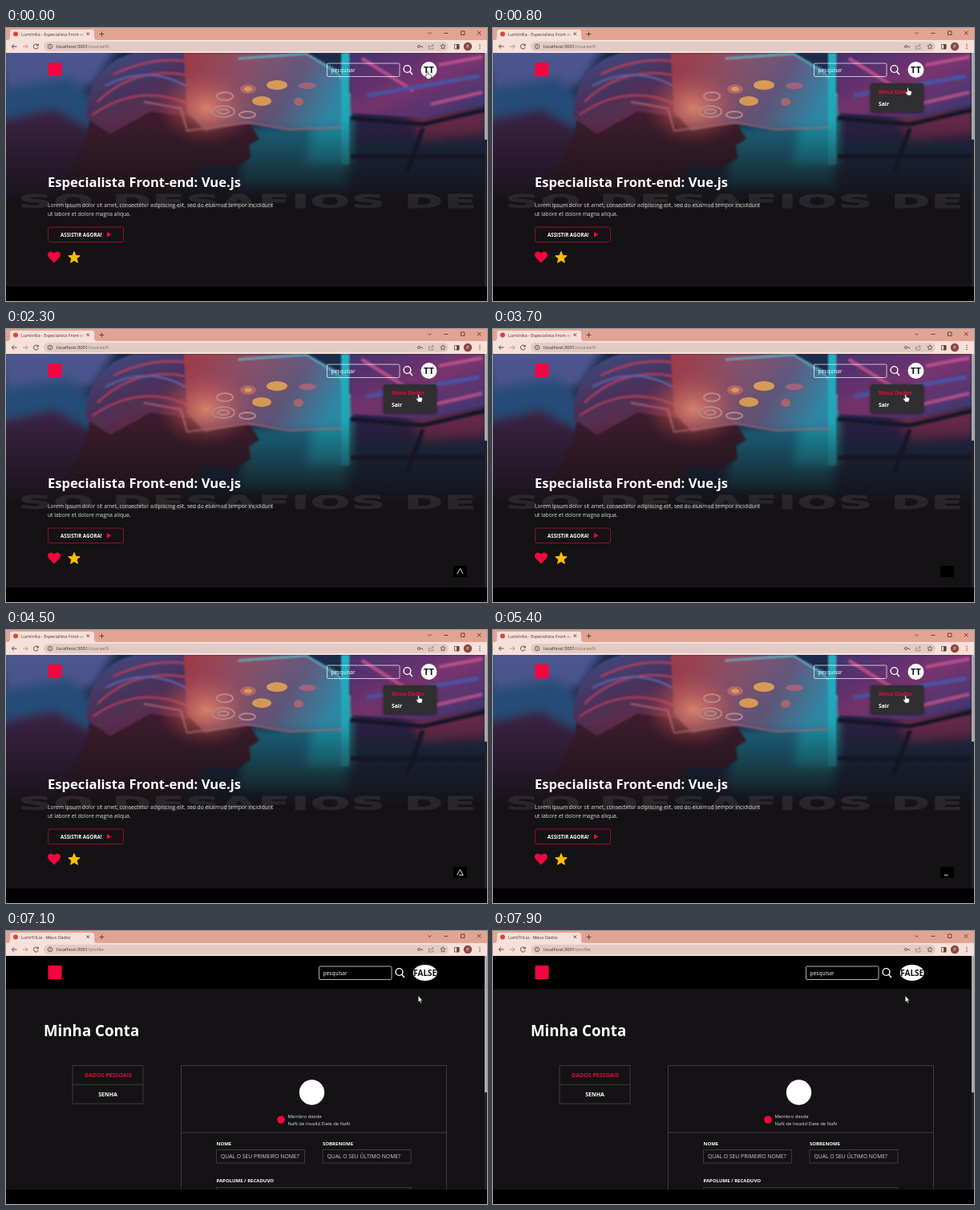
These frames come from a looping animation (600 px wide and 340 px high, 8000 ms). An HTML page:

```html
<!DOCTYPE html>
<html lang="pt">
<head>
<meta charset="utf-8">
<title>Lumitrilia</title>
<style>
html, body { margin: 0; width: 100%; height: 100%; overflow: hidden; background: #000; }
svg { display: block; width: 600px; height: 340px; }
text { font-family: "Open Sans", "Noto Sans", sans-serif; fill: #fff; white-space: pre; }
.b { font-weight: 700; }
.line { fill: none; stroke: #474648; stroke-width: .8; }
.icon { fill: none; stroke: #5b4742; stroke-width: 1; }
.white { fill: none; stroke: #fff; stroke-width: .9; }
.red { fill: #f5053f; }
</style>
</head>
<body>
<svg viewBox="0 0 600 340">
  <defs>
    <linearGradient id="fade" x2="0" y2="1">
      <stop offset="0" stop-color="#141214" stop-opacity="0"/>
      <stop offset=".4" stop-color="#141214" stop-opacity=".08"/>
      <stop offset=".65" stop-color="#141214" stop-opacity=".5"/>
      <stop offset=".92" stop-color="#141214"/>
    </linearGradient>
    <linearGradient id="visor" x2="1" y2=".3">
      <stop offset="0" stop-color="#a03a45"/>
      <stop offset=".35" stop-color="#8f4f66"/>
      <stop offset=".7" stop-color="#64597f"/>
      <stop offset="1" stop-color="#2e8fae"/>
    </linearGradient>
    <linearGradient id="hood" x2=".7" y2="1">
      <stop offset="0" stop-color="#3d4f8a"/>
      <stop offset=".45" stop-color="#4b3460"/>
      <stop offset="1" stop-color="#7b283f"/>
    </linearGradient>
    <linearGradient id="screen" x2="1" y2="1">
      <stop offset="0" stop-color="#43306f"/>
      <stop offset=".5" stop-color="#7a3570"/>
      <stop offset="1" stop-color="#353a78"/>
    </linearGradient>
    <radialGradient id="glow">
      <stop offset="0" stop-color="#ff9d78" stop-opacity=".75"/>
      <stop offset="1" stop-color="#d04848" stop-opacity="0"/>
    </radialGradient>
    <linearGradient id="tabFade">
      <stop offset="0" stop-color="#f7e0d9" stop-opacity="0"/>
      <stop offset="1" stop-color="#f7e0d9"/>
    </linearGradient>
    <filter id="soft" x="-20%" y="-20%" width="140%" height="140%"><feGaussianBlur stdDeviation="6"/></filter>
    <filter id="edge"><feGaussianBlur stdDeviation="1.2"/></filter>
    <clipPath id="view"><path d="M0 31H600V322H0z"/></clipPath>
  </defs>

  <g clip-path="url(#view)">
    <path d="M0 31H600V322H0z" fill="#141214"/>

    <g id="course">
      <path d="M0 31H597V215H0z" fill="#1c2b4a"/>
      <g filter="url(#soft)">
        <path d="M-10 20H140L110 70L0 90z" fill="#4b5790"/>
        <path d="M-10 75L80 60L130 110L90 140L-10 120z" fill="#28507e"/>
        <path d="M-10 115L60 100L150 150L160 215H-10z" fill="#3b2444"/>
        <path d="M300 125L425 115V200H290z" fill="#1b6c88"/>
        <path d="M385 110H428V170H375z" fill="#1c9bb0"/>
        <path d="M430 105H596V150H430z" fill="#2a2446"/>
        <path d="M430 140H600V200H430z" fill="#1c2c4a"/>
        <path d="M500 106L600 98V132L520 138z" fill="#6c2a4c"/>
      </g>
      <g filter="url(#edge)">
        <path d="M60 225C70 180 105 150 104 112C102 65 130 40 165 31H270L292 75L298 110L316 138L303 146L305 162L285 174L245 170L215 225z" fill="#3f1a2e"/>
        <path d="M100 112C100 65 125 40 160 31H262L278 80L238 112L180 104L130 132z" fill="url(#hood)"/>
        <path d="M114 92Q165 42 240 62M108 108Q165 68 226 94M134 58Q190 30 246 46" fill="none" stroke="#a8405c" stroke-width="2.5"/>
        <path d="M124 72Q180 42 234 78" fill="none" stroke="#5a64a8" stroke-width="2"/>
        <path d="M222 31H375L414 52L436 100L420 124L354 126L300 118L248 128L226 104z" fill="url(#visor)"/>
        <path d="M290 38L375 32L416 58L436 98" fill="none" stroke="#52b4c6" stroke-width="1.8"/>
        <path d="M172 92L218 100L226 128L302 118L354 127L420 124" fill="none" stroke="#b96f80" stroke-width="1.4"/>
        <path d="M428 31H597V96L522 112L430 106z" fill="url(#screen)"/>
        <path d="M418 31H428V170H418z" fill="#23b0c2"/>
        <path d="M430 112L520 120L597 102M520 125L500 180M430 160H597" fill="none" stroke="#16162a" stroke-width="5"/>
        <path d="M444 38L508 78M540 46L594 36M530 95L594 80" stroke="#b8508c" stroke-width="4"/>
        <path d="M450 84L590 60" stroke="#4a55a8" stroke-width="5"/>
      </g>
      <ellipse cx="250" cy="100" rx="62" ry="48" fill="url(#glow)"/>
      <g fill="#dfa05a">
        <ellipse cx="302" cy="76" rx="10" ry="6" fill="#b76a70"/>
        <ellipse cx="302" cy="76" rx="5" ry="3"/>
        <ellipse cx="338" cy="71" rx="13" ry="6"/>
        <ellipse cx="319" cy="91" rx="12" ry="6"/>
        <ellipse cx="365" cy="92" rx="6" ry="5" fill="#b06a72"/>
        <ellipse cx="376" cy="72" rx="11" ry="4" fill="#a86680"/>
      </g>
      <g fill="none" stroke="#c08f92" stroke-width="2">
        <ellipse cx="271" cy="104" rx="14" ry="7"/>
        <ellipse cx="271" cy="104" rx="7" ry="3"/>
        <ellipse cx="273" cy="85" rx="10" ry="5"/>
        <ellipse cx="301" cy="108" rx="10" ry="4"/>
      </g>
      <path d="M0 31H597V240H0z" fill="url(#fade)"/>
      <text transform="translate(16 223.500) scale(2.5 1)" font-size="23" letter-spacing=".9" class="b" stroke="#fff" stroke-width=".8" opacity=".08" style="font-family:'DejaVu Sans',sans-serif">SO DESAFIOS DE</text>

      <text x="52" y="198" font-size="16.600" class="b">Especialista Front-end: Vue.js</text>
      <g font-size="6.7" style="opacity:.85">
        <text x="52" y="223">Lorem ipsum dolor sit amet, consectetur adipiscing elit, sed do eiusmod tempor incididunt</text>
        <text x="52" y="234">ut labore et dolore magna aliqua.</text>
      </g>
      <rect x="52.5" y="248" width="94" height="18.5" rx="2" fill="none" stroke="#b00d35" stroke-width=".8"/>
      <text x="68" y="259.5" font-size="6.2" class="b">ASSISTIR AGORA!</text>
      <path class="red" d="M126 254L131.5 257.2L126 260.4z"/>
      <path class="red" d="M60 292.5L53.6 286C49 281 55 275.500 60 280.500C65 275.500 71 281 66.400 286z"/>
      <path id="star" fill="#ffbd0a" stroke="#ffbd0a" stroke-linejoin="round"/>
      <path d="M597 31H600V322H597z" fill="#242225"/>
      <path d="M597 31H600V139H597z" fill="#aaa"/>
    </g>

    <g id="profile">
      <path d="M0 31H600V72H0z" fill="#000"/>
      <text x="47" y="131" font-size="18.7" class="b">Minha Conta</text>
      <path class="line" d="M83 167.500H171V215H83zM83 191.300H171M218.500 330V167.500H549.500V330M218.500 251H549.500M262.500 272.500H372.500V289H262.500zM395 272.500H505V289H395zM262.500 330V319.500H505V330"/>
      <g class="b" font-size="7" text-anchor="middle">
        <text x="127.500" y="182" style="fill:#e5083f">DADOS PESSOAIS</text>
        <text x="127" y="205.800">SENHA</text>
      </g>
      <circle cx="381.500" cy="201" r="15.700" fill="#fff"/>
      <circle class="red" cx="343" cy="235" r="4.800"/>
      <g font-size="5.950" style="opacity:.88">
        <text x="351.500" y="232.700">Membro desde</text>
        <text x="351.500" y="241.800">NaN de Invalid Date de NaN</text>
      </g>
      <g class="b" font-size="6">
        <text x="262.500" y="266.700">NOME</text>
        <text x="395" y="266.700">SOBRENOME</text>
        <text x="262.500" y="313">PAPOLUME / RECADUVO</text>
      </g>
      <g font-size="6.800" style="opacity:.8">
        <text x="268" y="283.200">QUAL O SEU PRIMEIRO NOME?</text>
        <text x="400.500" y="283.200">QUAL O SEU ÚLTIMO NOME?</text>
      </g>
      <path d="M597 31H600V322H597z" fill="#242225"/>
      <path d="M597 31H600V201H597z" fill="#aaa"/>
    </g>

    <path class="red" d="M52.500 43H69.500V60H52.500z"/>
    <g id="search">
      <rect class="white" x="400.500" y="44" width="90.500" height="16.500" rx="1.500" style="stroke-width:.7"/>
      <text x="405.500" y="54.800" font-size="6.600">pesquisar</text>
      <g class="white" style="stroke-width:1.400"><circle cx="500.500" cy="51" r="4.400"/><path d="M503.700 54.300L507 58"/></g>
    </g>
    <ellipse id="avatar" cy="52" ry="10" fill="#fff"/>
    <text id="initials" y="56" class="b" text-anchor="middle" style="fill:#111"></text>

    <g id="menu">
      <rect x="471" y="69" width="66" height="35.500" rx="2.500" fill="#2f2e30" style="filter:drop-shadow(0 1px 2px #0008)"/>
      <g class="b" font-size="6.800">
        <text id="data" x="481" y="82">Meus Dados</text>
        <text x="481" y="97">Sair</text>
      </g>
    </g>

    <g id="build">
      <rect x="558" y="295" width="17" height="14" rx="1.500" fill="#000"/>
      <path id="spin" class="white" pathLength="100" d="M562.700 305.200L566.500 298.500L570.300 305.200z"/>
    </g>
  </g>

  <!-- browser frame -->
  <path d="M0 0H600V15H0z" fill="#e3a392"/>
  <path d="M2 15Q5 15 5 11V5Q5 2 8 2H107Q110 2 110 5V11Q110 15 113 15H600V31H0V15z" fill="#f7e0d9"/>
  <circle cx="12" cy="7.500" r="3" fill="#dc4437"/>
  <text id="title" x="19" y="9.500" font-size="5.400" style="fill:#46302c"></text>
  <path d="M89 3H99V13H89z" fill="url(#tabFade)"/>
  <path d="M99 3H109V13H99z" fill="#f7e0d9"/>
  <rect x="47" y="17" width="505" height="12" rx="6" fill="#e2cbc5"/>
  <text x="63" y="25" font-size="5.800" style="fill:#302724">localhost:3001<tspan id="path" fill="#7a6761"></tspan></text>
  <path class="icon" d="M100.500 5.500L104 9M104 5.500L100.500 9M116.500 7.500H122.500M119.500 4.500V10.500M526.500 5.500L528.500 7.500L530.500 5.500M546.500 6.500H551.500M567.500 4H572V8.500H567.500zM588 4L592.500 8.500M592.500 4L588 8.500
    M13.500 23H7.500M10 20.300L7.300 23L10 25.700M40 21.500A3 3 0 1 0 40.300 24M40.300 19.800V22H38"/>
  <path class="icon" style="opacity:.45" d="M21 23H27M24.500 20.300L27.200 23L24.500 25.700"/>
  <g class="icon" style="stroke-width:.800">
    <circle cx="55" cy="23" r="2.800"/><path d="M55 22.500V24.500M55 21V21.800"/>
    <circle cx="515" cy="23" r="1.500"/><path d="M516.500 23H519.500V24.500"/>
    <path d="M529 22H527.500V26H533V24M529.500 24Q530 21.500 533 21.500M531.500 20L533.200 21.500L531.500 23" style="opacity:.6"/>
    <path d="M545 19.800L546 22L548.200 22.200L546.500 23.700L547 26L545 24.800L543 26L543.500 23.700L541.800 22.200L544 22z"/>
    <path d="M559.500 20.500H565V26H559.500z"/><path d="M562.500 20.500H565V26H562.500z" fill="#5b4742"/>
  </g>
  <circle cx="576" cy="23" r="5.200" fill="#8a4a43"/>
  <text x="576" y="25" font-size="5.500" text-anchor="middle">P</text>
  <g fill="#5b4742"><circle cx="591" cy="20.500" r=".7"/><circle cx="591" cy="23" r=".7"/><circle cx="591" cy="25.500" r=".7"/></g>

  <g id="cursor" stroke="#222" stroke-width=".6" fill="#fff" stroke-linejoin="round">
    <path id="hand" d="M-1.200 1V-4Q-.300 -5.200 .600 -4V-1.200L3.800 -.400Q4.800 0 4.500 1.500L3.600 5H-.800L-3.300 1.200Q-3.200 -.100 -2.200 .300z"/>
    <path id="arrow" d="M-.800 -5.500V2.700L1 1.100L2.200 3.900L3.500 3.300L2.300 .700H4.700z"/>
  </g>
</svg>
<script>
const LOOP = 8000, MENU = 450, MOVE = [500, 950], BUILD = [1700, 5500], LOAD = 7000;
const el = id => document.getElementById(id);
const show = (id, on) => el(id).style.display = on ? '' : 'none';
const ease = x => x * x * (3 - 2 * x);
const clamp = x => Math.max(0, Math.min(1, x));

const starPoints = Array.from({ length: 10 }, (_, i) => {
  const r = i % 2 ? 3.4 : 7.6, a = i * Math.PI / 5;
  return [85 + r * Math.sin(a), 286 - r * Math.cos(a)];
});
el('star').setAttribute('d', 'M' + starPoints.join('L') + 'z');

function draw(t) {
  const loaded = t >= LOAD;
  show('course', !loaded);
  show('profile', loaded);
  show('menu', t >= MENU && !loaded);
  show('hand', !loaded);
  show('arrow', loaded);

  el('title').textContent = loaded ? 'LumiTriLia - Meus Dados' : 'Lumitrilia - Especialista Front-end';
  el('path').textContent = loaded ? '/profile' : '/course/9';
  el('search').setAttribute('transform', `translate(${loaded ? -10 : 0})`);
  const x = loaded ? 522.7 : 527.5;
  el('avatar').setAttribute('cx', x);
  el('avatar').setAttribute('rx', loaded ? 15 : 10);
  el('initials').setAttribute('x', x);
  el('initials').setAttribute('font-size', loaded ? 10 : 11);
  el('initials').textContent = loaded ? 'FALSE' : 'TT';

  const move = ease(clamp((t - MOVE[0]) / (MOVE[1] - MOVE[0])));
  el('cursor').setAttribute('transform', `translate(${526 - 11 * move} ${58.5 + 27.5 * move})`);
  el('data').style.fill = move > .6 ? '#e5083f' : '#fff';

  // the outline draws itself, then runs out
  show('build', t >= BUILD[0] && t < BUILD[1]);
  const phase = Math.max(0, t - BUILD[0]) % 2000 / 1000;
  const offset = phase < 1 ? 100 - 100 * ease(phase) : -100 * ease(phase - 1);
  el('spin').style.strokeDasharray = '100 200';
  el('spin').style.strokeDashoffset = offset;
  el('spin').style.opacity = Math.min(1, 4 * (1 - Math.abs(1 - phase)));
}

function tick() {
  draw(performance.now() % LOOP);
  requestAnimationFrame(tick);
}
tick();
</script>
</body>
</html>
```
